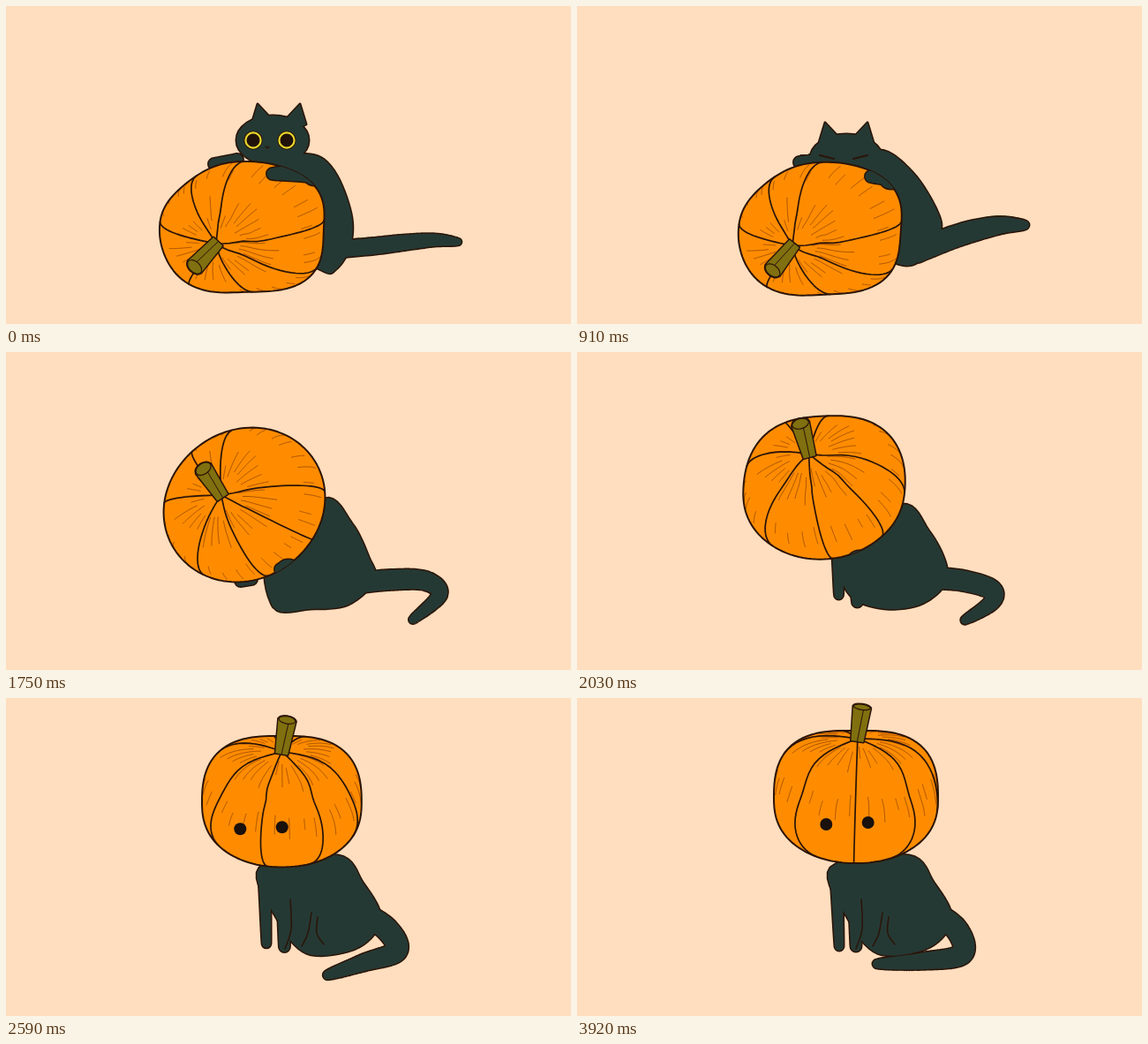
These frames come from a looping animation (640x360 px, 4.2 s). An HTML page with a canvas:

```html
<!DOCTYPE html>
<html lang="en">
<head>
<meta charset="utf-8">
<title>Cat and pumpkin</title>
<style>
  html, body { margin: 0; width: 100%; height: 100%; overflow: hidden; background: #ffdebf; }
  canvas { display: block; width: 100vw; height: 100vh; }
</style>
</head>
<body>
<canvas id="stage" width="640" height="360"></canvas>
<script>
const ctx = document.getElementById('stage').getContext('2d');
const BG = '#ffdebf', INK = '#2b1408', FUR = '#253934', ORANGE = '#ff8c00', STEM = '#80700f';
const LOOP = 4200, STEP = 70, DEG = Math.PI / 180;

const SEATED = [[376, 178], [405, 210], [424, 244], [415, 270], [387, 287], [340, 289], [308, 252], [287, 192]];
const SEATED_LEGS = [[294, 205], [297, 281], [315, 215], [316, 281]];

// Each pose: the pumpkin (centre, radii, squareness, lean of its corners, skew, pole on the unit ball,
// spin of the ribs, angle of the stem) and the cat (torso, spine and width of the tail, head, paws).
// A part missing from a pose is not shown there.
const poses = [
  { // hugging the pumpkin
    centre: [267, 250], radii: [93, 74], square: 2.4, lean: [.06, .06], skew: -.02,
    pole: [-.29, .24], spin: 8, stem: 133,
    torso: [[345, 168], [372, 187], [391, 235], [390, 272], [374, 298], [357, 299], [300, 260], [300, 180]],
    tail: [[370, 276], [415, 272], [450, 268], [485, 265], [512, 267]], fat: 9.5,
    head: [302, 152], turn: 7, farPaw: [[236, 179], [262, 174]], nearPaw: [[350, 188], [302, 190]]
  },
  { // crouched
    centre: [275, 252], radii: [92, 75], square: 2.4, lean: [.05, .05], skew: -.03,
    pole: [-.31, .24], spin: 8, stem: 129,
    torso: [[342, 163], [380, 188], [408, 232], [411, 258], [388, 289], [360, 291], [300, 260], [300, 190]],
    tail: [[385, 278], [425, 262], [455, 253], [482, 248], [507, 248]], fat: 12.5,
    head: [305, 173], turn: 0, farPaw: [[252, 177], [270, 175]], nearPaw: [[356, 192], [333, 193]]
  },
  { // hidden behind it
    centre: [275, 213], radii: [95, 86], square: 2.4, lean: [0, -.02], skew: 0,
    pole: [-.28, .12], spin: 2, stem: 156,
    torso: [[362, 175], [388, 194], [408, 226], [428, 252], [400, 284], [345, 292], [296, 292], [300, 200]],
    tail: [[400, 262], [440, 254], [478, 252], [494, 274], [474, 293]], fat: 12,
    head: [300, 205], turn: 0, farPaw: [[270, 250], [280, 250]], nearPaw: [[385, 215], [385, 215]]
  },
  { // lifting it
    centre: [270, 173], radii: [91, 87], square: 2, lean: [0, 0], skew: -.05,
    pole: [-.3, -.13], spin: 18, stem: 236,
    torso: [[360, 166], [392, 194], [411, 232], [418, 258], [388, 286], [345, 291], [303, 289], [297, 225]],
    tail: [[395, 262], [435, 258], [475, 259], [491, 275], [461, 303]], fat: 11.5,
    legs: [[303, 260], [306, 285], [318, 260], [322, 283]], face: -34,
    farPaw: [[266, 259], [278, 257]], nearPaw: [[320, 250], [311, 246]]
  },
  { // wearing it, head low
    centre: [290, 134], radii: [92, 75], square: 2.5, lean: [0, -.07], skew: 0,
    pole: [-.07, -.78], spin: -4, stem: 273,
    torso: SEATED,
    tail: [[400, 250], [435, 259], [464, 279], [446, 294], [418, 304]], fat: 12,
    legs: [[289, 205], [287, 265], [312, 220], [313, 283]], face: -25,
    farPaw: [[290, 190], [290, 190]], nearPaw: [[320, 230], [320, 230]]
  },
  { // sitting upright
    centre: [318, 113], radii: [90, 74], square: 2.45, lean: [0, -.03], skew: 0,
    pole: [.02, -.76], spin: -18, stem: 281,
    torso: SEATED,
    tail: [[400, 240], [430, 262], [437, 288], [395, 301], [351, 316]], fat: 13,
    legs: SEATED_LEGS, face: -23
  },
  { // facing front
    centre: [316, 112], radii: [93, 75], square: 2.5, lean: [0, -.045], skew: 0,
    pole: [.02, -.88], spin: -3, stem: 278,
    torso: SEATED,
    tail: [[400, 240], [430, 262], [436, 290], [390, 298], [340, 301]], fat: 12.5,
    legs: SEATED_LEGS, face: -10
  }
];

// [time, pose]: straight runs between these marks
const timeline = [[0, 0], [420, 0], [910, 1], [1470, 2], [1750, 3], [2310, 4], [2660, 5], [2870, 5.4],
  [3080, 5], [3220, 5.6], [3430, 5.75], [3570, 5.75], [3710, 5.85], [3780, 5.85], [3920, 6], [LOOP, 6]];

const ribLongitudes = [0, 45, 84, 170, 205, 253, 315];
const creases = [[[322, 228], [323, 261], [316, 284]], [[346, 243], [342, 266], [335, 281]],
  [[353, 248], [352, 266], [360, 279]]];

let seed = 7;
const random = () => (seed = seed * 16807 % 2147483647) / 2147483647;
const hairs = Array.from({ length: 64 }, (_, i) => {
  const from = (i % 2 ? 1.05 : .22) + .15 * random();
  return { longitude: (i + random()) * 360 / 64, from, to: from + .15 + .3 * random() };
});

const mix = (a, b, k) => Array.isArray(a) ? a.map((v, i) => mix(v, b[i], k)) : a + (b - a) * k;

function poseAt(time) {
  const next = timeline.findIndex(mark => mark[0] > time);
  const [t0, p0] = timeline[next - 1], [t1, p1] = timeline[next];
  return mix(p0, p1, (time - t0) / (t1 - t0));
}

function blend(pose) {
  const index = Math.min(Math.floor(pose), poses.length - 2), next = poses[index + 1];
  return Object.fromEntries(Object.entries(poses[index])
    .filter(([name]) => name in next)
    .map(([name, value]) => [name, mix(value, next[name], pose - index)]));
}

// Point of the Catmull-Rom curve through the points, u from 0 to 1
function curvePoint(points, u, closed) {
  const n = points.length, spans = closed ? n : n - 1;
  const i = Math.min(Math.floor(u * spans), spans - 1), t = u * spans - i;
  const at = j => points[closed ? (j + n) % n : Math.max(0, Math.min(n - 1, j))];
  const [a, b, c, d] = [at(i - 1), at(i), at(i + 1), at(i + 2)];
  return [0, 1].map(k => b[k] + t / 2 * (c[k] - a[k] + t * (2 * a[k] - 5 * b[k] + 4 * c[k] - d[k]
    + t * (3 * (b[k] - c[k]) + d[k] - a[k]))));
}

const sample = (count, f) => Array.from({ length: count + 1 }, (_, i) => f(i / count));

function polyline(points, closed) {
  const path = new Path2D();
  points.forEach(p => path.lineTo(...p));
  if (closed) path.closePath();
  return path;
}

const smooth = (points, closed) => polyline(sample(64, u => curvePoint(points, u, closed)), closed);

function ellipse([x, y], rx, ry = rx, turn = 0) {
  const path = new Path2D();
  path.ellipse(x, y, rx, ry, turn, 0, 2 * Math.PI);
  return path;
}

// Round limb along a spine, with the radius given as a function of u
function limb(spine, radius) {
  const path = new Path2D();
  sample(80, u => path.addPath(ellipse(curvePoint(spine, u), radius(u))));
  return path;
}

function stroke(path, width, color = INK) {
  ctx.lineWidth = width;
  ctx.strokeStyle = color;
  ctx.stroke(path);
}

function fill(path, color) {
  ctx.fillStyle = color;
  ctx.fill(path);
}

// Ink first, then fur, so that joined parts share one outline
function drawFur(paths) {
  paths.forEach(path => stroke(path, 3));
  paths.forEach(path => fill(path, FUR));
}

function headPaths([x, y], turn) {
  const ears = [-1, 1].map(side => {
    const tipX = x + turn + side * 24, tipY = y - 41;
    return polyline([[tipX + side * 7, tipY + 23], [tipX, tipY], [tipX - side * 15, tipY + 16], [x, y]], true);
  });
  return [ellipse([x, y], 41, 28), ...ears];
}

function drawCatFace([x, y], open) {
  for (const side of [-1, 1]) {
    const eye = [x - 3 + side * 19, y];
    if (open > .15) {
      const ring = ellipse(eye, 8.6, 8.6 * open);
      fill(ring, '#21130c');
      stroke(ring, 4);
      stroke(ring, 2.2, '#e5d62d');
    } else {
      stroke(polyline([[eye[0] - 8, y - 2 + side * 2], [eye[0] + 8, y - 2 - side * 2]]), 2);
    }
  }
  stroke(polyline([[x - 8, y + 7], [x - 6, y + 9], [x - 4, y + 7]]), 1.5);
}

// The pumpkin is a ball whose ribs and hairs are meridians, pressed into a squarish outline
function makePumpkin({ centre, radii, square, lean, skew, pole, spin }) {
  const [px, py] = pole, pz = Math.sqrt(1 - px * px - py * py), level = Math.sqrt(1 - py * py);
  const axis = [px, py, pz];
  const down = [-py * px / level, level, -py * pz / level];
  const side = [pz / level, 0, -px / level];

  const project = ([x, y]) => {
    const angle = Math.atan2(y, x), c = Math.cos(angle), s = Math.sin(angle), diagonal = Math.sin(2 * angle);
    const edge = (Math.abs(c) ** square + Math.abs(s) ** square) ** (-1 / square)
      * (1 + diagonal * diagonal * (lean[0] * c + lean[1] * s) + skew * diagonal);
    return [centre[0] + radii[0] * x * edge, centre[1] + radii[1] * y * edge];
  };
  const meridian = (longitude, from, to) => {
    const a = (longitude + spin) * DEG;
    return polyline(sample(40, u => mix(from, to, u))
      .map(phi => axis.map((v, i) => v * Math.cos(phi)
        + Math.sin(phi) * (down[i] * Math.cos(a) + side[i] * Math.sin(a))))
      .filter(v => v[2] >= 0).map(project));
  };
  const shell = polyline(sample(120, u => project([Math.cos(u * 2 * Math.PI), Math.sin(u * 2 * Math.PI)])), true);
  return { shell, meridian, base: project(axis), facing: pz };
}

function drawStem([x, y], angle, facing) {
  const c = Math.cos(angle), s = Math.sin(angle), depth = 6.5 * facing;
  const at = (along, across) => [x + c * along - s * across, y + s * along + c * across];
  const stalk = polyline([at(-3, -7), at(36, -10), at(36, 10), at(-3, 7)], true);
  const cap = ellipse(at(36, 0), depth, 9.5, angle);
  stroke(cap, 3);
  stroke(stalk, 3);
  fill(stalk, STEM);
  fill(cap, STEM);
  stroke(cap, 1.2);
  stroke(polyline([at(-3, 0), at(36 - depth, 2)]), 1);
}

function drawPumpkin({ shell, meridian, base, facing }, stemAngle) {
  fill(shell, ORANGE);
  hairs.forEach(hair => stroke(meridian(hair.longitude, hair.from, hair.to), .8, '#8f4208'));
  ribLongitudes.forEach(longitude => stroke(meridian(longitude, 0, Math.PI), 1.7));
  stroke(shell, 2);
  drawStem(base, stemAngle * DEG, facing);
}

function draw(time) {
  const pose = poseAt(Math.floor(time / STEP) * STEP);
  const { torso, tail, fat, head, turn, legs, farPaw, nearPaw, face, stem, ...shape } = blend(pose);
  const pumpkin = makePumpkin(shape);

  ctx.fillStyle = BG;
  ctx.fillRect(0, 0, 640, 360);

  const fur = [smooth(torso, true), limb(tail, u => fat * (1 - .6 * u ** 3))];
  if (legs) fur.push(limb(legs.slice(0, 2), u => 7 - 2 * u), limb(legs.slice(2), u => 8 - 2 * u));
  if (head) fur.push(...headPaths(head, turn));
  if (farPaw) fur.push(limb(farPaw, () => 6.5));
  drawFur(fur);

  if (pose > 3.5) creases.forEach(points => stroke(smooth(points), 1.5));
  if (head) drawCatFace(head, 1 - pose / .6);

  drawPumpkin(pumpkin, stem);
  if (pose > 3.6) {
    for (const side of [-1, 1]) {
      fill(ellipse([shape.centre[0] + face + side * 23.7, shape.centre[1] + 30 - side], 7), '#1a100c');
    }
  }
  if (nearPaw) {
    ctx.save();
    ctx.clip(pumpkin.shell);
    drawFur([limb(nearPaw, u => 15 - 8.5 * Math.sqrt(u))]);
    ctx.restore();
  }
}

ctx.lineJoin = ctx.lineCap = 'round';
function tick() {
  draw(performance.now() % LOOP);
  requestAnimationFrame(tick);
}
tick();
</script>
</body>
</html>
```
